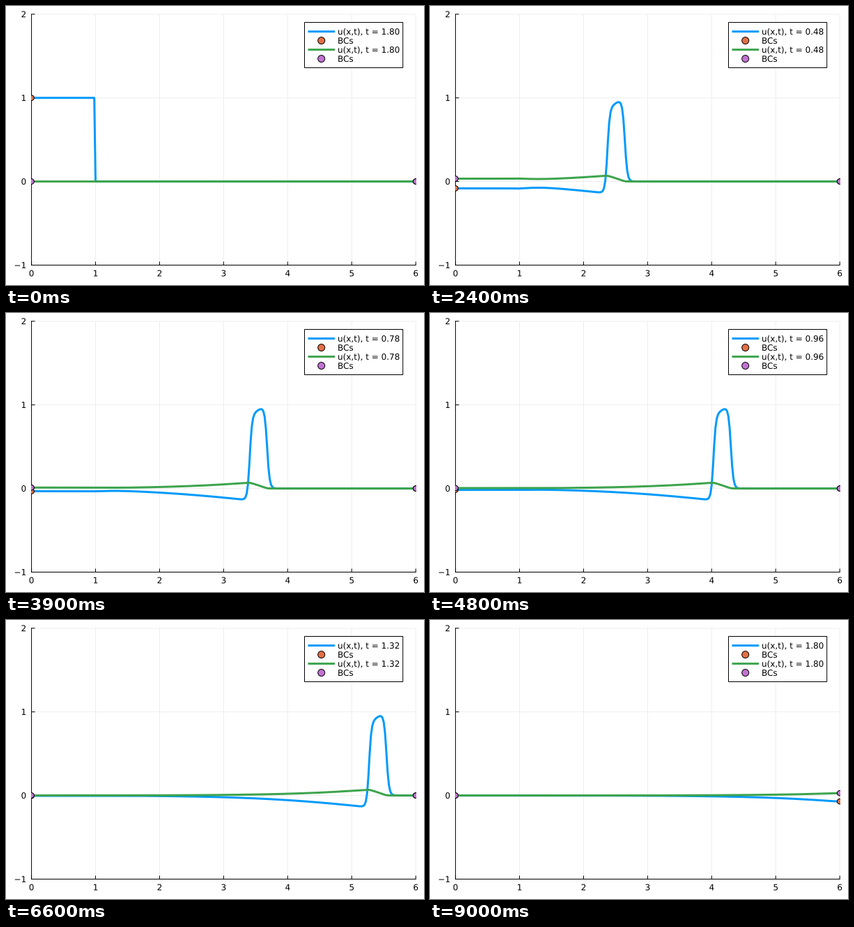
Write a matplotlib script that moves like this. It is 600 px wide and 400 px high and loops after 9.05 s.

```python
import numpy as np
import matplotlib.pyplot as plt
from matplotlib.animation import FuncAnimation
from matplotlib.patches import Circle, PathPatch, Rectangle
from matplotlib.textpath import TextPath
from matplotlib.transforms import Affine2D

W, H, DPI = 600, 400, 100
PX = 72 / DPI  # points per pixel
FRAMES, INTERVAL = 181, 50
BLUE, ORANGE, GREEN, PURPLE = "#009afa", "#e26f46", "#3da44d", "#c271d2"
LEFT, RIGHT, TOP, BOTTOM = 36.6, 588.2, 11.8, 371.5
FONT_PX = 12

plt.rcParams["font.family"] = "DejaVu Sans"

# FitzHugh-Nagumo pulse on [0, 6] with zero-flux ends
X = np.linspace(0, 6, 301)
DX = X[1] - X[0]
DT, SUBSTEPS = 1e-4, 100
RATE, THRESHOLD = 1000.0, 0.3


def solve(diffusion, frames):
    u = np.where(np.arange(X.size) < 50, 1.0, 0.0)
    v = np.zeros_like(u)
    lap = np.zeros_like(u)
    k = diffusion / DX**2
    states = [(u, v)]
    for _ in range(frames - 1):
        for _ in range(SUBSTEPS):
            lap[1:-1] = u[2:] - 2 * u[1:-1] + u[:-2]
            lap[0] = 2 * (u[1] - u[0])
            lap[-1] = 2 * (u[-2] - u[-1])
            du = k * lap + RATE * (u * (1 - u) * (u - THRESHOLD) - v)
            dv = u - v
            u = u + DT * du
            v = v + DT * dv
        states.append((u, v))
    return states


def front(u):
    i = min(np.flatnonzero(u > 0.5)[-1], X.size - 2)
    return X[i] + DX * (u[i] - 0.5) / (u[i] - u[i + 1])


# choose the diffusion that puts the front at x = 4.955 when t = 1.15
diffusion = 0.2
for _ in range(4):
    reached = front(solve(diffusion, 116)[-1][0])
    diffusion *= ((4.955 - 0.99) / (reached - 0.99)) ** 2
states = solve(diffusion, FRAMES)

# one layer in pixel units, y pointing down
fig = plt.figure(figsize=(W / DPI, H / DPI), dpi=DPI, facecolor="white")
ax = fig.add_axes([0, 0, 1, 1])
ax.set(xlim=(0, W), ylim=(H, 0))
ax.axis("off")


def px(x):
    return LEFT + x * (RIGHT - LEFT) / 6


def py(y):
    return BOTTOM - (y + 1) * (BOTTOM - TOP) / 3


def stroke(xs, ys, color="black", width=1.0, z=1, cap="butt"):
    return ax.plot(xs, ys, color=color, lw=width * PX, zorder=z, snap=False,
                   solid_capstyle=cap, solid_joinstyle="round")[0]


def dot(x, y, radius, color, z):
    return ax.add_patch(Circle((x, y), radius, fc=color, ec="black", lw=PX,
                               zorder=z, snap=False))


def text_path(x, y, text, align=0.0):
    """Outline of text centred on y; align 0, 0.5, 1 is left, centre, right."""
    path = TextPath((0, 0), text, size=FONT_PX)
    # advance width of the digits and minus sign used for aligned labels
    width = FONT_PX * sum(0.838 if c == "\u2212" else 0.636 for c in text)
    place = Affine2D().scale(1, -1).translate(x - align * width, y + 0.365 * FONT_PX)
    return place.transform_path(path)


def label(*args):
    return ax.add_patch(PathPatch(text_path(*args), fc="black", lw=0, zorder=9, snap=False))


# grid, ticks, axes
for i in range(7):
    stroke([px(i)] * 2, [TOP, BOTTOM], "#eeeeee", z=0)
    stroke([px(i)] * 2, [BOTTOM, BOTTOM - 5])
    label(px(i), 383.1, str(i), 0.5)
for j in range(-1, 3):
    stroke([LEFT, RIGHT], [py(j)] * 2, "#eeeeee", z=0)
    stroke([LEFT, LEFT + 5], [py(j)] * 2)
    label(29.2, py(j), str(j).replace("-", "\u2212"), 1.0)
stroke([LEFT, LEFT], [TOP, BOTTOM], cap="projecting")
stroke([LEFT, RIGHT], [BOTTOM, BOTTOM], cap="projecting")

# legend box
ax.add_patch(Rectangle((428.5, 23.5), 141.2, 65, fc="white", ec="black", lw=PX,
                       zorder=8, snap=False))
area = Rectangle((LEFT - 0.5, TOP - 0.5), RIGHT - LEFT + 1, BOTTOM - TOP + 1,
                 transform=ax.transData)
LEGEND_X = 476


class Series:
    def __init__(self, y, line_color, dot_color, z):
        self.y = y
        self.line = stroke([], [], line_color, 3, z)
        self.ends = [dot(px(x), 0, 3.8, dot_color, z + 1) for x in (0, 6)]
        for artist in (self.line, *self.ends):
            artist.set_clip_path(area)
        stroke([433.5, 472], [y, y], line_color, 3, 9)
        dot(452.7, y + 13, 5, dot_color, 9)
        label(LEGEND_X, y + 13, "BCs")
        self.text = label(LEGEND_X, y, "u")

    def show(self, values, t):
        self.line.set_data(px(X), py(values))
        for end, x, value in zip(self.ends, (0, 6), values[[0, -1]]):
            end.center = px(x), py(value)
        self.text.set_path(text_path(LEGEND_X, self.y, f"u(x,t), t = {t:.2f}"))


curves = [Series(36.6, BLUE, ORANGE, 2), Series(62.6, GREEN, PURPLE, 4)]


def update(n):
    t = (n or FRAMES - 1) / 100
    for curve, values in zip(curves, states[n]):
        curve.show(values, t)
    return []


anim = FuncAnimation(fig, update, frames=FRAMES, interval=INTERVAL,
                     init_func=lambda: update(0), repeat=True, repeat_delay=0)
plt.show()
```
